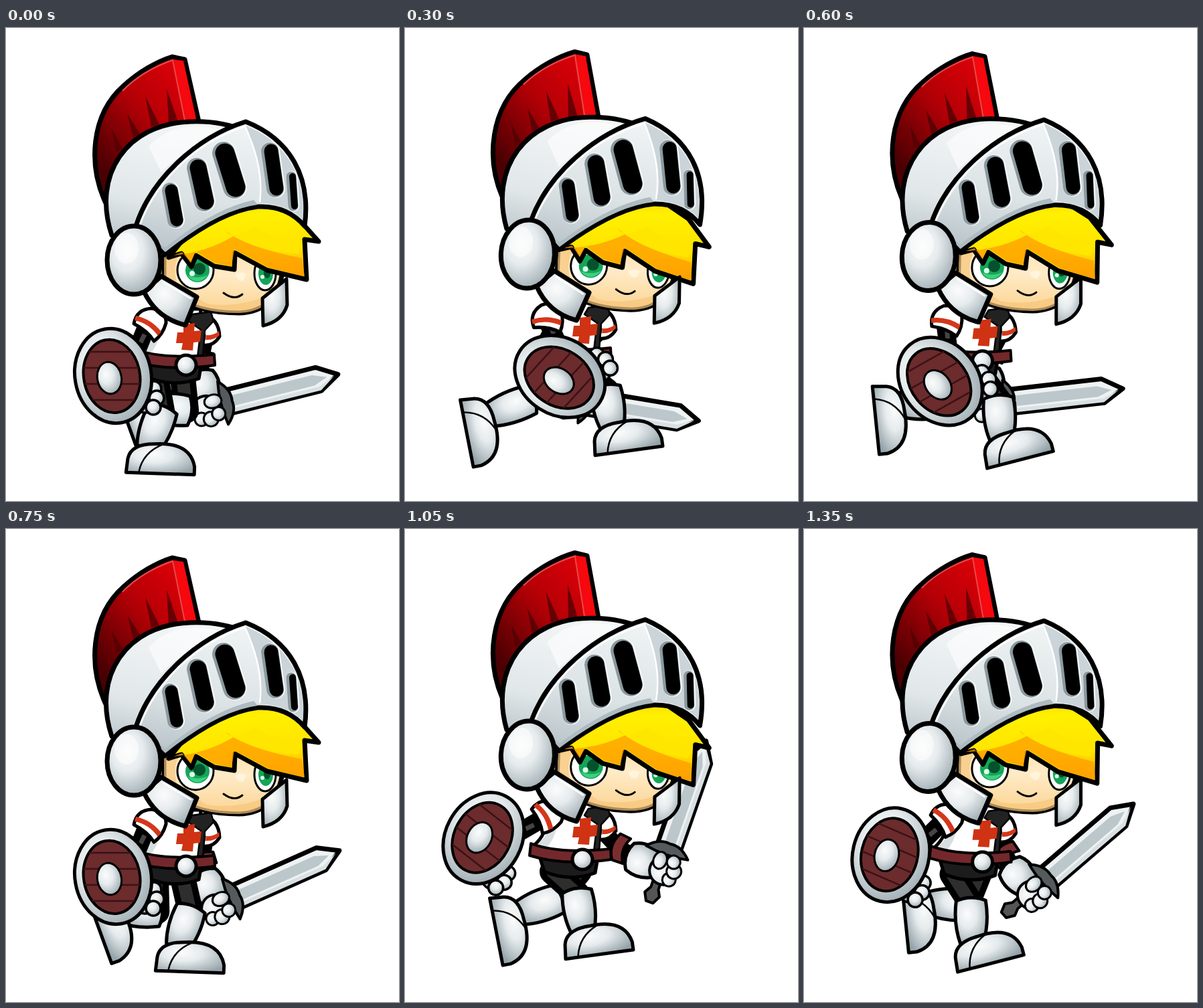
An HTML page that plays this animation: 587x707 px, repeating every 1.5 s.

```html
<!DOCTYPE html>
<html lang="en">
<head>
<meta charset="utf-8">
<title>Running knight</title>
<style>
  html, body { margin: 0; width: 100%; height: 100%; overflow: hidden; background: #fff; }
  svg { display: block; width: 587px; height: 707px; }
  .ink { stroke: #000; stroke-linejoin: round; stroke-linecap: round; }
  .bold { stroke-width: 7; }
  .line { fill: none; }
  .steel { fill: url(#steel); }
  .limb { fill: none; stroke: #000; stroke-linecap: round; stroke-linejoin: round; }
</style>
</head>
<body>
<svg viewBox="0 0 587 707" stroke-width="5">
  <defs>
    <radialGradient id="steel" cx=".38" cy=".36" r=".75">
      <stop offset="0" stop-color="#fbfcfc"/><stop offset=".4" stop-color="#e6ebed"/><stop offset="1" stop-color="#94a3a9"/>
    </radialGradient>
    <linearGradient id="domeFill" x1=".5" y1="0" x2=".3" y2="1">
      <stop offset="0" stop-color="#f3f6f7"/><stop offset=".6" stop-color="#e1e7e9"/><stop offset="1" stop-color="#b2bec3"/>
    </linearGradient>
    <linearGradient id="visorFill" x1=".6" y1="0" x2=".35" y2="1">
      <stop offset="0" stop-color="#f0f4f5"/><stop offset=".6" stop-color="#dce3e5"/><stop offset="1" stop-color="#bac5ca"/>
    </linearGradient>
    <linearGradient id="crestFill" x1=".8" y1=".05" x2=".2" y2=".85">
      <stop offset="0" stop-color="#dc0008"/><stop offset=".45" stop-color="#b30006"/><stop offset="1" stop-color="#4a0003"/>
    </linearGradient>
    <linearGradient id="hairFill" x1=".35" y1="0" x2=".5" y2="1">
      <stop offset="0" stop-color="#ffb400"/><stop offset=".3" stop-color="#fff000"/><stop offset=".7" stop-color="#ffe400"/><stop offset="1" stop-color="#ffb000"/>
    </linearGradient>
    <linearGradient id="skinFill" x1="0" y1="0" x2="0" y2="1">
      <stop offset="0" stop-color="#ffdf9f"/><stop offset=".5" stop-color="#ffebc8"/><stop offset="1" stop-color="#fbd492"/>
    </linearGradient>
    <clipPath id="woodClip"><ellipse cx="-2" rx="42" ry="55"/></clipPath>
    <clipPath id="faceClip"><path d="M236 330V380Q262 426 348 426Q402 424 412 370V310Z"/></clipPath>
  </defs>

  <path id="upperArm" class="limb" stroke-width="25"/>
  <g id="swordArm">
    <path class="limb" stroke-width="25" d="M-19-70L-25-42"/>
    <path class="ink" stroke-width="4" fill="#7b2e30" d="M-39-74Q-20-87 2-75L0-58Q-20-69-39-57Z"/>
    <path class="ink steel" d="M-46-50Q-26-62-5-51Q6-30-8-7L-42-5Q-55-28-46-50Z"/>
    <path class="ink" stroke-width="4" fill="#555" d="M-58-6H0V6H-58L-68 11L-80 5V-6L-68-12Z"/>
    <path class="ink bold" fill="#eef2f3" d="M6-18H145L175 0L145 18H6Z"/>
    <path fill="#bcc7cb" d="M8-8H137L158 0L137 8H8Z"/>
    <path fill="#d9e0e3" d="M6 11H144L169 1L145 17H6Z"/>
    <path class="ink" stroke-width="4" fill="#555b5d" d="M-2-33Q15-17 12 0Q15 17-2 33Q-8 0-2-33Z"/>
    <ellipse class="ink steel" stroke-width="4" cx="-29" cy="4" rx="21" ry="21"/>
    <g class="steel ink" stroke-width="3"><circle cx="-39" cy="16" r="10"/><circle cx="-25" cy="19" r="11"/><circle cx="-12" cy="14" r="10"/><ellipse cx="-16" cy="-6" rx="13" ry="10"/></g>
  </g>

  <g id="farLeg"></g>
  <g id="nearLeg"></g>

  <g id="torso">
    <path class="ink" fill="#1c1c1c" d="M202 490L212 522Q250 538 288 524L294 490Z"/>
    <path class="ink" fill="#fff" d="M295 429Q318 434 319 461Q310 476 294 474L288 440Z"/>
    <path fill="#d5371b" d="M299 459Q310 460 318 453L319 459Q311 467 298 466Z"/>
    <path class="ink" fill="#fff" d="M222 420H290L296 460L290 493Q240 500 193 486Q213 470 215 450Z"/>
    <path fill="#d9dfe0" d="M199 484Q217 470 221 450L231 452Q228 474 214 488Z"/>
    <path fill="#222" class="ink" stroke-width="2.5" d="M278 428L306 424L310 438L297 452L294 492L286 492L291 451L272 438Z"/>
    <path fill="#cf3313" d="M265 443L282 441L281 453L292 452L290 469L280 470L279 482L262 481L264 471L254 471L256 455L265 455Z"/>
    <path class="ink" stroke-width="4" fill="#73282c" d="M192 480Q235 496 311 488L312 504Q240 514 190 498Z"/>
    <circle class="ink steel" cx="269" cy="504" r="15"/>
  </g>

  <g id="shieldArm">
    <path class="limb" stroke-width="27" d="M210 446L198 476"/>
    <path fill="none" stroke="#444" stroke-width="7" d="M207 458L201 470"/>
    <g class="ink steel" stroke-width="3.5"><circle cx="208" cy="554" r="21"/><circle cx="221" cy="539" r="11"/><circle cx="225" cy="553" r="11"/><circle cx="220" cy="567" r="11"/></g>
    <g transform="translate(160 520) rotate(-10)">
      <ellipse class="ink steel" rx="57" ry="71"/>
      <ellipse class="ink" stroke-width="4" fill="#6c2b2d" cx="-2" rx="42" ry="55"/>
      <g clip-path="url(#woodClip)" fill="none">
        <path id="planks" transform="rotate(10)" stroke="#3a1214" stroke-width="2.5"/>
      </g>
      <ellipse class="ink steel" stroke-width="3" cx="-6" cy="2" rx="18" ry="24"/>
    </g>
  </g>
  <g id="sleeve">
    <path class="ink" fill="#fff" d="M191 442Q195 420 218 419Q240 424 239 441Q234 459 221 468Q211 452 191 442Z"/>
    <path fill="#d5371b" d="M194 430Q217 435 232 454L227 460Q213 441 192 437Z"/>
  </g>

  <g id="head">
    <path class="ink bold" fill="url(#crestFill)" d="M150 264C122 206 126 130 176 86C198 66 225 50 248 43L267 47L288 140L200 188Z"/>
    <path fill="#f5080e" d="M250 47L265 49L284 136L267 138Z"/>
    <path fill="none" stroke="#e64a4a" stroke-width="2" d="M174 94Q203 64 249 48L267 138"/>
    <path fill="#520004" opacity=".8" d="M240 91L257 140L243 143ZM208 102L229 144L217 148ZM181 128L200 158L190 164ZM158 152L174 180L165 186Z"/>
    <path class="ink bold" fill="url(#domeFill)" d="M158 310C128 220 180 143 275 140Q320 138 358 154L300 260L225 345Z"/>
    <path fill="#fff" opacity=".6" d="M213 177Q240 148 283 147Q304 148 326 154Q269 177 232 216Z"/>

    <path class="ink bold" fill="url(#skinFill)" d="M236 330V380Q262 426 348 426Q402 424 412 370V310Z"/>
    <g clip-path="url(#faceClip)">
      <path fill="#f7c77c" opacity=".7" d="M236 330H266Q245 350 257 386L300 412Q350 420 405 394L390 430H236Z"/>
      <path fill="#fff4dc" d="M342 369Q352 362 359 369L354 378Q345 378 342 369Z"/>
      <ellipse class="ink" stroke-width="3" fill="#fff" cx="283" cy="362" rx="27" ry="28"/>
      <circle cx="286" cy="362" r="18" fill="#14a558"/>
      <path fill="#3ed07f" d="M271 370Q286 388 302 369Q287 376 271 370Z"/>
      <circle cx="289" cy="360" r="9" fill="#05522c"/>
      <circle cx="278" cy="367" r="4" fill="#d9ffe8"/>
      <ellipse class="ink" stroke-width="3" fill="#fff" cx="387" cy="367" rx="16" ry="25"/>
      <ellipse cx="388" cy="367" rx="11" ry="17" fill="#14a558"/>
      <ellipse cx="390" cy="366" rx="5" ry="8" fill="#05522c"/>
      <circle cx="383" cy="372" r="3" fill="#d9ffe8"/>
    </g>
    <path class="ink line" stroke-width="3" d="M325 396Q341 408 353 398"/>

    <g id="hair">
      <path class="ink bold" fill="url(#hairFill)" d="M243 343L262 337L277 357L284 340L311 356L341 361L342 336L390 362L449 376L446 316L467 319L432 280L360 240L285 290Z"/>
      <path fill="#ff9d00" opacity=".75" d="M250 340Q300 335 340 311Q330 307 329 304Q360 328 442 344L446 371L393 358L341 331L337 356L312 351L283 334L276 351L263 335Z"/>
      <path fill="#ffe600" d="M341 312Q385 335 437 337L442 320Q400 315 372 297Z"/>
    </g>

    <path class="ink bold" fill="url(#visorFill)" d="M194 296C216 228 282 164 358 140C424 166 456 222 446 296Q420 265 376 267Q318 274 237 339Z"/>
    <path fill="#aebbc1" d="M209 302Q222 320 238 328Q310 270 370 257L376 264Q316 272 238 335Z"/>
    <path fill="#cbd4d8" d="M358 146C414 168 449 218 443 286Q424 265 380 261Q386 210 358 146Z"/>
    <path fill="none" stroke="#fff" stroke-width="2.5" d="M200 294C226 225 286 170 357 147Q386 210 379 260"/>
    <g id="slots" fill="none" stroke-linecap="round"></g>

    <path class="ink steel bold" d="M206 394L232 371L285 402L268 444Q225 434 206 394Z"/>
    <path fill="none" stroke="#fff" stroke-width="2.5" d="M234 379L277 405"/>
    <path class="ink steel" d="M383 404L419 375L420 414Q413 438 384 445Z"/>
    <ellipse class="ink steel bold" cx="191" cy="347" rx="40" ry="51"/>
    <ellipse cx="180" cy="329" rx="18" ry="23" fill="#fff" opacity=".55"/>
  </g>
</svg>
<script>
const STEP = 150, COUNT = 10;
const THIGH = 50, SHIN = 58;
const $ = id => document.getElementById(id);
const place = (el, value) => el.setAttribute('transform', value);

// Key poses on the run cycle: at = step, pose = [x, y, angle].
const footKeys = [
  { at: 0, pose: [231, 644, 2] },      // stand
  { at: 1, pose: [166, 641, 39] },     // push off
  { at: 2.5, pose: [103, 588, 90] },   // trail
  { at: 5, pose: [161, 594, 70] },     // fold
  { at: 6, pose: [211, 634, 38] },     // pass
  { at: 7.5, pose: [307, 607, -21] }   // reach
];
const swordKeys = [
  { at: 0, pose: [326, 560, -14] },
  { at: 2.5, pose: [262, 556, 10] },
  { at: 5, pose: [338, 552, -24] },
  { at: 7.5, pose: [395, 476, -74] }
];

// Smooth closed curve through the key poses.
function follow(keys, step) {
  const n = keys.length, t = step % COUNT;
  const key = i => {
    const turn = Math.floor(i / n), { at, pose } = keys[i - turn * n];
    return { at: at + turn * COUNT, pose };
  };
  let i = n - 1;
  while (keys[i].at > t) i--;
  const [a, b, c, d] = [i - 1, i, i + 1, i + 2].map(key);
  const span = c.at - b.at, u = (t - b.at) / span;
  return b.pose.map((p, k) => {
    const q = c.pose[k];
    const leave = span * (q - a.pose[k]) / (c.at - a.at);
    const arrive = span * (d.pose[k] - p) / (d.at - b.at);
    return p + u * leave + u * u * (3 * (q - p) - 2 * leave - arrive)
      + u ** 3 * (2 * (p - q) + leave + arrive);
  });
}

// Maps a point of a placed part to the stage.
function toStage([x, y, angle], px, py) {
  const r = angle * Math.PI / 180, c = Math.cos(r), s = Math.sin(r);
  return [x + px * c - py * s, y + px * s + py * c];
}

function poseLeg(leg, hipX, hipY, foot) {
  const [ankleX, ankleY] = toStage(foot, -20, -14);
  const dx = ankleX - hipX, dy = ankleY - hipY, reach = Math.hypot(dx, dy);
  const stretch = Math.max(1, reach / (THIGH + SHIN - 4));
  const thigh = THIGH * stretch, shin = SHIN * stretch;
  const along = (reach * reach + thigh * thigh - shin * shin) / (2 * reach);
  const bend = Math.sqrt(Math.max(0, thigh * thigh - along * along));
  const kneeX = hipX + (dx * along + dy * bend) / reach;
  const kneeY = hipY + (dy * along - dx * bend) / reach;
  const turn = Math.atan2(ankleY - kneeY, ankleX - kneeX) * 180 / Math.PI - 90;

  for (const part of leg.querySelectorAll('.thigh'))
    part.setAttribute('d', `M${hipX} ${hipY}L${kneeX} ${kneeY}`);
  const plate = leg.querySelector('.shin');
  plate.setAttribute('d', `M-22-4Q0-13 22-4Q27 ${shin / 2} 17 ${shin}H-17Q-27 ${shin / 2}-22-4Z`);
  place(plate, `translate(${kneeX} ${kneeY}) rotate(${turn})`);
  place(leg.querySelector('.foot'), `translate(${foot[0]} ${foot[1]}) rotate(${foot[2]})`);
}

function draw(step) {
  const swing = Math.sin(2 * Math.PI * step / COUNT);
  const lift = Math.abs(swing) * 1.05;
  const sway = -4 * lift, rise = -10 * lift;
  const bob = `translate(${sway} ${rise})`;
  const shieldTurn = swing * (swing > 0 ? -50 : -40);

  place($('head'), `matrix(1 ${.027 * lift} ${-.042 * lift} 1 ${6.9 * lift} ${-14.2 * lift})`);
  place($('hair'), `rotate(${3.5 * lift} 300 230)`);
  place($('torso'), bob);
  place($('sleeve'), `${bob} rotate(${shieldTurn * .65} 222 440)`);
  place($('shieldArm'), `${bob} rotate(${shieldTurn} 210 440)`);

  const sword = follow(swordKeys, step);
  place($('swordArm'), `translate(${sword[0]} ${sword[1]}) rotate(${sword[2]})`);
  $('upperArm').setAttribute('d', `M${298 + sway} ${460 + rise}L${toStage(sword, -19, -70).join(' ')}`);

  // The far leg runs half a cycle behind and stands further right.
  const [x, y, angle] = follow(footKeys, step + COUNT / 2);
  poseLeg($('nearLeg'), 224 + sway, 522 + rise, follow(footKeys, step));
  poseLeg($('farLeg'), 264 + sway, 522 + rise, [x + 44, y - 4, angle]);
}

$('nearLeg').innerHTML = $('farLeg').innerHTML = `
  <path class="limb thigh" stroke-width="38"/>
  <path class="limb thigh" stroke-width="19" style="stroke:#2e2e2e"/>
  <path class="ink steel shin"/>
  <g class="foot">
    <path class="ink steel" d="M-51 22L-49 1Q-45-21-10-22Q43-27 51 10V22Z"/>
    <path class="ink line" stroke-width="2.5" d="M-32 21Q-27-9 3-22"/>
  </g>`;

$('planks').setAttribute('d', [-36, -12, 12, 36].map(y => `M-60 ${y}H60`).join(''));

// Eye slots of the visor: both ends and the width.
$('slots').innerHTML = [
  [246, 243, 254, 287, 19], [286, 209, 297, 259, 25], [326, 187, 342, 238, 29],
  [395, 184, 403, 240, 21], [427, 222, 430, 266, 10]
].map(([x1, y1, x2, y2, w]) => {
  const slot = (dx, color, width) =>
    `<path stroke="${color}" stroke-width="${width}" d="M${x1 + dx} ${y1}L${x2 + dx} ${y2}"/>`;
  return slot(0, '#f7fafa', w + 7) + slot(-1, '#8b999f', w + 5) + slot(1, '#000', w);
}).join('');

const start = performance.now();
function tick() {
  draw(Math.floor((performance.now() - start) / STEP) % COUNT);
  requestAnimationFrame(tick);
}
tick();
</script>
</body>
</html>
```
